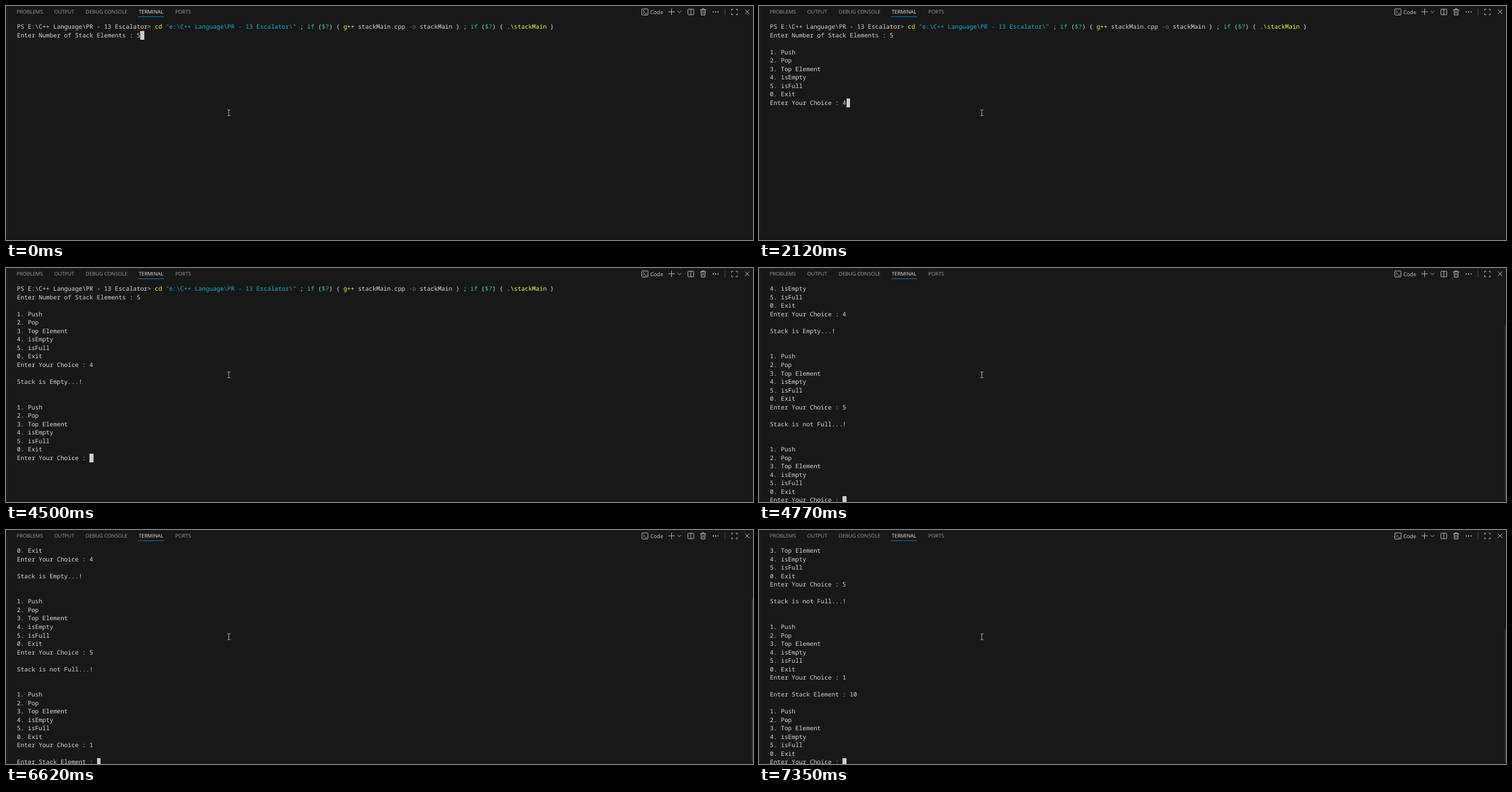
Recreate the animation shown at these times as an HTML page. Size 1280 px wide and 402 px high, loop 8000 ms.

```html
<!DOCTYPE html>
<html lang="en">
<head>
<meta charset="utf-8">
<title>Stack menu in a terminal</title>
<style>
  html, body { margin: 0; width: 100%; height: 100%; overflow: hidden; background: #181818; }
  #stage { position: relative; width: 1280px; height: 402px; overflow: hidden; background: #181818; text-rendering: geometricPrecision; }
  #stage > * { position: absolute; }
  svg { left: 0; top: 0; }
  .tabs text { font: 8.75px "Open Sans", sans-serif; fill: #9d9d9d; }
  .tabs .on { fill: #e7e7e7; }
  .icons { fill: none; stroke: #ccc; stroke-width: 0.9; }
  .icons text, .icons .solid { fill: #ccc; stroke: none; }
  .icons text { font: 9.2px "Open Sans", sans-serif; }
  #term { left: 18.8px; top: 28.7px; width: 1240px; height: 373.3px; overflow: hidden; }
  #out { position: relative; top: 0.5px; margin: 0; font: 500 10.375px/14.525px "Noto Sans Mono", monospace; font-variant-ligatures: none; color: #d8d8d8; white-space: pre; }
  #caret { position: absolute; width: 6.5px; height: 14.525px; background: #ccc; }
  #slider { left: 1278px; width: 2px; bottom: 3px; background: #343434; }
  .y { color: #f5f543; }
  .c { color: #14aed6; }
  .g { color: #23d18b; }
  .d { color: #767676; }
</style>
</head>
<body>
<div id="stage">
  <svg width="1280" height="402">
    <path d="M1.5 0V399" stroke="#242424"/>
    <path d="M1278.5 0V399M0 400.5H1280" stroke="#131313"/>
    <g class="tabs">
      <text x="18" y="13.2">PROBLEMS</text>
      <text x="82.5" y="13.2">OUTPUT</text>
      <text x="136.5" y="13.2">DEBUG CONSOLE</text>
      <text x="227.5" y="13.2" class="on">TERMINAL</text>
      <text x="290" y="13.2">PORTS</text>
      <path d="M226 18.5H271" stroke="#0078d4"/>
    </g>
    <g class="icons">
      <rect x="1089.5" y="5" width="10.5" height="10.5" rx="1"/>
      <path d="M1091.5 7.5L1094.3 10.2L1091.5 13M1095 13H1098.5"/>
      <text x="1104" y="13.7">Code</text>
      <path d="M1140.5 4.5V15.5M1135 10H1146"/>
      <path d="M1150.8 8.6L1153.8 11.6L1156.8 8.6"/>
      <rect x="1168.5" y="5.5" width="10" height="9.5" rx="0.8"/>
      <path d="M1173.5 5.5V15"/>
      <path d="M1189.5 6.5H1199.5M1192.7 6.5V4.8H1196.3V6.5M1190.8 6.5L1191.3 15.5H1197.7L1198.2 6.5M1193.2 8.5V13.5M1195.8 8.5V13.5"/>
      <g class="solid">
        <circle cx="1211.8" cy="10.2" r="1"/>
        <circle cx="1216" cy="10.2" r="1"/>
        <circle cx="1220.2" cy="10.2" r="1"/>
      </g>
      <path d="M1232 4V16" stroke="#5a5a5a"/>
      <path d="M1246 5.5H1243.5V8M1250.5 5.5H1253V8M1243.5 12.5V15H1246M1253 12.5V15H1250.5"/>
      <path d="M1266.3 6.3L1273.7 13.7M1273.7 6.3L1266.3 13.7"/>
    </g>
  </svg>
  <div id="term"><pre id="out"></pre><div id="caret"></div></div>
  <div id="slider"></div>
  <svg width="1280" height="402">
    <path d="M379.5 178.5H381L381.8 179.2L382.6 178.5H384.5M381.8 179V188M379.5 188.5H381L381.8 187.8L382.6 188.5H384.5" fill="none" stroke="#c8c8c8" stroke-width="0.9"/>
  </svg>
</div>
<script>
  const LOOP = 8000, ROWS = 26, CELL = 6.225, LINE = 14.525;
  const $ = id => document.getElementById(id);
  const paint = (cls, s) => `<span class="${cls}">${s}</span>`;

  const test = `${paint('g', 'if')} (${paint('g', '$?')})`;
  const command = 'PS E:\\C++ Language\\PR - 13 Escalator&gt; ' +
    `${paint('y', 'cd')} ${paint('c', '"e:\\C++ Language\\PR - 13 Escalator\\"')} ; ` +
    `${test} { ${paint('y', 'g++')} stackMain.cpp ${paint('d', '-o')} stackMain } ; ` +
    `${test} { ${paint('y', '.\\stackMain')} }`;
  const menu = '1. Push\n2. Pop\n3. Top Element\n4. isEmpty\n5. isFull\n0. Exit\nEnter Your Choice : ';

  // Text appended to the terminal at each time
  const writes = [
    [0, command + '\nEnter Number of Stack Elements : 5'],
    [190, '\n\n' + menu],
    [2120, '4'],
    [2320, '\n'],
    [2390, '\nStack is Empty...!\n\n\n' + menu],
    [4570, '5'],
    [4770, '\n\nStack is not Full...!\n\n\n' + menu],
    [6220, '1'],
    [6620, '\n\nEnter Stack Element : '],
    [6890, '1'],
    [7090, '0'],
    [7350, '\n\n' + menu]
  ];

  let shown = 0;
  function render(t) {
    const due = writes.filter(([at]) => at <= t);
    if (due.length === shown) return;
    shown = due.length;
    const lines = due.map(([, text]) => text).join('').split('\n');
    const scroll = Math.max(0, lines.length - ROWS);
    const view = lines.slice(scroll);
    $('out').innerHTML = view.join('\n');
    $('caret').style.left = view[view.length - 1].length * CELL + 'px';
    $('caret').style.top = (view.length - 1) * LINE + 'px';
    $('slider').style.height = scroll ? 370 * ROWS / lines.length + 'px' : 0;
  }

  const start = performance.now();
  function tick() {
    render((performance.now() - start) % LOOP);
    requestAnimationFrame(tick);
  }
  tick();
</script>
</body>
</html>
```
